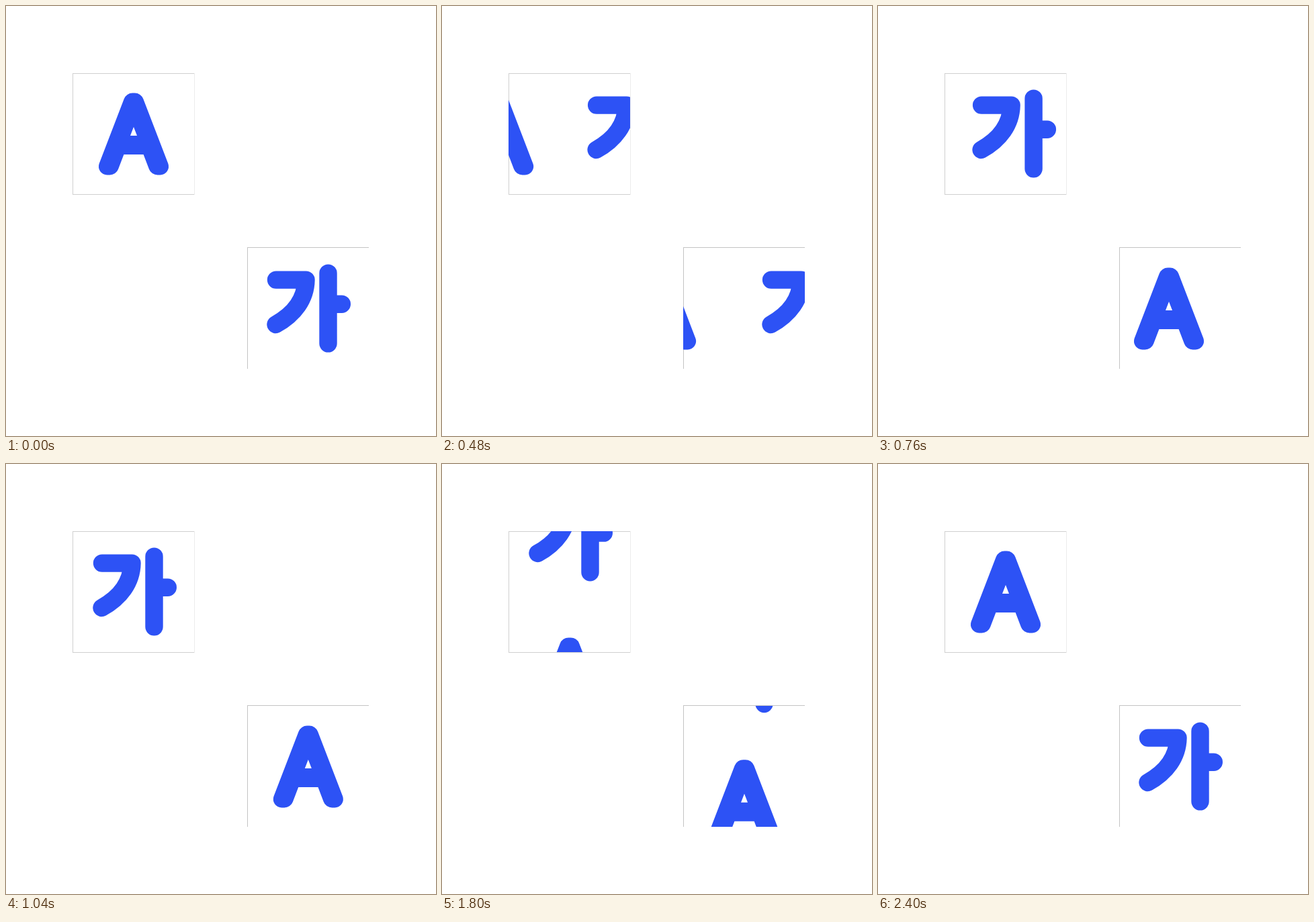
An HTML page with a canvas that plays this animation: 640 by 640 pixels, repeating every 2800 ms.

```html
<!DOCTYPE html>
<html lang="en">
<head>
<meta charset="utf-8">
<title>Sliding letters</title>
<style>
  html, body { margin: 0; height: 100%; overflow: hidden; background: #fff; }
  canvas { display: block; }
</style>
</head>
<body>
<canvas id="stage" width="640" height="640"></canvas>
<script>
const ctx = document.getElementById('stage').getContext('2d');
const BLUE = '#2d52f5', LOOP = 2800, HALF = 1400, STEP = 40;

const latinPath = new Path2D(
  'M138.7 234.5 L175.7 138.2 A13.5 13.5 0 0 1 188.3 129.5 H191.7 ' +
  'A13.5 13.5 0 0 1 204.3 138.2 L241.3 234.5 A12.6 12.6 0 0 1 229.5 251.5 ' +
  'H225.5 A13.5 13.5 0 0 1 212.9 242.7 L204.6 221 H175.4 L167.1 242.7 ' +
  'A13.5 13.5 0 0 1 154.5 251.5 H150.5 A12.6 12.6 0 0 1 138.7 234.5 Z ' +
  'M190 180 L185 193 H195 Z');
const hangulPath = new Path2D(
  'M142 147.6 H186.5 C186 176 169 199 141.5 214 ' +
  'M219.5 137.7 V242.3 M219.5 183.7 H239.8');

const latin = () => ctx.fill(latinPath, 'evenodd');
const hangul = () => ctx.stroke(hangulPath);
const hangulRight = () => { ctx.translate(1, 0); hangul(); };

// Each box swaps its two glyphs sideways by dx, then back vertically by dy.
const boxes = [
  { offset: 0, delay: 0, first: latin, second: hangulRight, dx: -193, dy: -210 },
  { offset: 260, delay: 40, first: hangul, second: latin, dx: 212, dy: 196 }
];

// cubic-bezier(.6, 0, .2, 1)
function ease(x) {
  if (x <= 0) return 0;
  if (x >= 1) return 1;
  let lo = 0, hi = 1, s;
  for (let i = 0; i < 24; i++) {
    s = (lo + hi) / 2;
    const r = 1 - s;
    if (1.8 * s * r * r + 0.6 * s * s * r + s * s * s < x) lo = s; else hi = s;
  }
  return s * s * (3 - 2 * s);
}

function place(glyph, x, y) {
  ctx.save();
  ctx.translate(x, y);
  glyph();
  ctx.restore();
}

function line(color, x, y, w, h) {
  ctx.fillStyle = color;
  ctx.fillRect(x, y, w, h);
}

function drawFrames() {
  line('#d0d0d0', 99, 100, 181, 1);
  line('#d0d0d0', 99, 100, 1, 181);
  line('#d0d0d0', 99, 280, 181, 1);
  line('#ececec', 280, 100, 1, 181);
  line('#c4c4c4', 359, 359, 181, 1);
  line('#c4c4c4', 359, 359, 1, 181);
}

function drawBox({ offset, delay, first, second, dx, dy }, t) {
  ctx.save();
  ctx.translate(offset, offset);
  ctx.beginPath();
  ctx.rect(99, 100, 181, 180);
  ctx.clip();
  if (t < HALF) {
    const p = ease((t - 40 - delay) / 1000);
    place(first, dx * p, 0);
    place(second, dx * (p - 1), 0);
  } else {
    const p = ease((t - HALF - 40 - delay) / 920);
    place(first, 0, dy * (p - 1));
    place(second, 0, dy * p);
  }
  ctx.restore();
}

function draw() {
  const t = Math.floor(performance.now() % LOOP / STEP) * STEP;
  ctx.clearRect(0, 0, 640, 640);
  drawFrames();
  ctx.fillStyle = ctx.strokeStyle = BLUE;
  ctx.lineWidth = 26.4;
  ctx.lineCap = ctx.lineJoin = 'round';
  for (const box of boxes) drawBox(box, t);
  requestAnimationFrame(draw);
}
draw();
</script>
</body>
</html>
```
